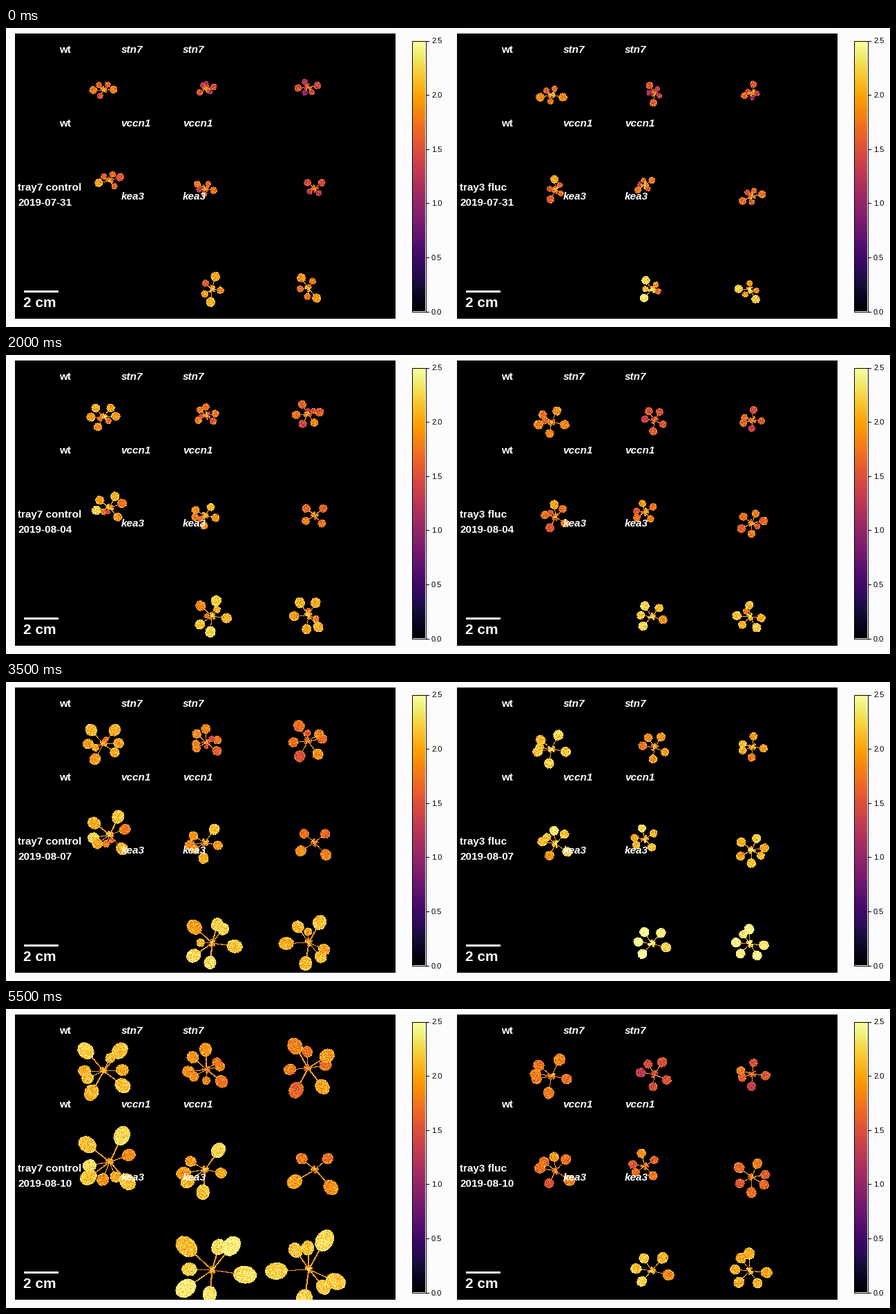
A matplotlib script that plays this animation: 1280x434 px, repeating every 6000 ms.

```python
import numpy as np
import matplotlib.pyplot as plt
from matplotlib.animation import FuncAnimation
from matplotlib.patches import Rectangle

W, H, DPI = 1280, 434, 100
TOP, BOTTOM = 8, 422
PANELS = (13, 653)
PANEL_W = 551
VMAX = 2.5
LAST_DAY = 10

# Share of full reach held by the true leaves, oldest first
LEAF_SHARE = (1, .97, .92, .9, .65, .55)


class Tray:
    """Growth habit and mean signal (day, value) shared by the plants of one tray."""

    def __init__(self, name, seed_reach, leaf_start, seed_share, power, signal):
        self.name, self.power, self.signal = name, power, signal
        self.seed_reach, self.leaf_start, self.seed_share = seed_reach, leaf_start, seed_share
        self.plants = []

    def plant(self, x, y, size, offset, *angles):
        """Angles in degrees, clockwise from the right: two seed leaves, then true leaves."""
        self.plants.append((x, y, size, offset, np.radians(angles)))

    def level(self, day):
        return np.interp(day, *zip(*self.signal))

    def reach(self, i, day):
        """Distance of leaf i from the crown as a share of plant size, or None."""
        if i < 2:
            birth, start, end = 0, self.seed_reach, self.seed_share
        else:
            birth = max(0, 2 * (i - 4))
            start = self.leaf_start if birth == 0 else .15
            end = LEAF_SHARE[i - 2]
        if day < birth:
            return None
        return start + (end - start) * ((day - birth) / (LAST_DAY - birth)) ** self.power


control = Tray("tray7 control", .38, .25, .7, 1.5, [(0, 1.85), (1, 2), (10, 2.02)])
control.plant(141, 90, 39, 0, 180, -3, -131, -51, 119, 37, 155, -62)
control.plant(290, 88, 29, -.2, -13, 150, -92, 38, -137, 174, -36, 90)
control.plant(437, 86, 37, -.28, 176, -10, -120, 118, 52, -33, -92)
control.plant(150, 222, 42, .05, 170, -20, -65, -142, 48, 144, 111, 69)
control.plant(288, 233, 34, 0, -150, 12, -55, 95, 170, 145)
control.plant(447, 233, 35, -.2, -140, -40, 48, 149)
control.plant(298, 379, 50, .1, -74, 95, -137, 8, 145, -51, 182)
control.plant(438, 378, 48, .08, -124, 50, -61, 177, 98, 24, -92)

fluctuating = Tray("tray3 fluc", .65, .38, .85, .8,
                   [(0, 1.92), (1, 1.58), (3, 1.65), (5, 2.05), (7, 2.22), (9, 1.85), (10, 1.75)])
fluctuating.plant(790, 97, 26, 0, 168, 12, -64, 100, -141, 186)
fluctuating.plant(939, 95, 21, -.3, -122, 97, -58, 188, 24)
fluctuating.plant(1081, 94, 19, -.15, 160, -85, 8, 95, -165)
fluctuating.plant(796, 235, 24, 0, -97, 118, 35, -170, -49, -142)
fluctuating.plant(925, 228, 19, 0, -33, 145, -105, 50, 187)
fluctuating.plant(1080, 244, 23, -.05, -10, 152, -143, 92, -68, 32)
fluctuating.plant(935, 380, 25, .35, -122, 133, 14, -50, 188)
fluctuating.plant(1077, 380, 25, .35, 185, 58, -92, 6, 133, -125)

TRAYS = (control, fluctuating)


def draw_stalk(field, x, y, angle, reach, rng):
    steps = np.linspace(0, reach, int(2 * reach) + 2)
    xs = (x + steps * np.cos(angle)).astype(int)
    ys = (y + steps * np.sin(angle)).astype(int)
    field[ys, xs] = rng.normal(2, .25, len(steps))
    if reach > 28:
        field[ys, xs + 1] = rng.normal(1.9, .25, len(steps))


def draw_blade(field, x, y, r, angle, value, rng):
    m = int(r * 1.3) + 2
    x0, y0 = int(x) - m, int(y) - m
    part = field[y0:y0 + 2 * m + 1, x0:x0 + 2 * m + 1]
    py, px = np.mgrid[:part.shape[0], :part.shape[1]]
    dx, dy = px + x0 + .5 - x, py + y0 + .5 - y
    stretch = 1 + .025 * max(0, r - 6)
    along = (dx * np.cos(angle) + dy * np.sin(angle)) / stretch
    across = (dy * np.cos(angle) - dx * np.sin(angle)) * stretch ** .5
    dist = np.hypot(along, across) + rng.normal(0, .2, part.shape)
    tone = value + rng.normal(0, .22, part.shape)
    tone += np.where(dist > r - 1, rng.uniform(-.2, .45, part.shape), 0)
    inside = dist < r
    part[inside] = np.clip(tone, .15, VMAX)[inside]


def draw_plant(field, tray, number, day):
    x, y, size, offset, angles = tray.plants[number]
    rng = np.random.default_rng([day, number])
    tints = np.random.default_rng(number).normal(0, .1, len(angles))
    level = tray.level(day) + offset
    leaves = [(a, size * s, t) for i, (a, t) in enumerate(zip(angles, tints))
              if (s := tray.reach(i, day)) is not None]
    for angle, reach, _ in leaves:
        draw_stalk(field, x, y, angle, reach, rng)
    for angle, reach, tint in leaves:
        age = .01 * (reach - 25) - .05 * max(0, 13 - reach)
        draw_blade(field, x + reach * np.cos(angle), y + reach * np.sin(angle),
                   2 + .25 * reach, angle, level + tint + age, rng)
    # Young leaves crowded at the crown
    for angle in angles[:4] + .6:
        draw_blade(field, x + 4 * np.cos(angle), y + 4 * np.sin(angle),
                   2, angle, level - rng.uniform(0, .4), rng)
    draw_blade(field, x, y, 2.5, 0, level + .1, rng)


def value_field(day):
    field = np.full((H, W), np.nan)
    for left, tray in zip(PANELS, TRAYS):
        field[TOP:BOTTOM, left:left + PANEL_W] = 0
        for number in range(len(tray.plants)):
            draw_plant(field, tray, number, day)
    field[BOTTOM:] = np.nan
    return field


plt.rcParams["font.family"] = "Liberation Sans"
fig = plt.figure(figsize=(W / DPI, H / DPI), dpi=DPI, facecolor="#fcfcff")
ax = fig.add_axes([0, 0, 1, 1])
ax.axis("off")


def show(data, extent):
    return ax.imshow(data, cmap="inferno", vmin=0, vmax=VMAX, extent=extent,
                     interpolation="nearest", aspect="auto")


def label(x, y, text, size=11, **style):
    return ax.text(x, y, text, size=size, color="white", weight="bold", **style)


image = show(value_field(0), (0, W, H, 0))
dates = []
for left, tray in zip(PANELS, TRAYS):
    for y, mutant in ((36, "stn7"), (143, "vccn1"), (249, "kea3")):
        if mutant != "kea3":
            label(left + 64, y, "wt")
        for dx in (153.5, 243):
            label(left + dx, y, mutant, style="italic")
    label(left + 4, 236, tray.name)
    dates.append(label(left + 4, 258, ""))
    ax.add_patch(Rectangle((left + 12.5, 381), 50.5, 2.5, color="white", lw=0))
    label(left + 12, 405, "2 cm", 15)

    bar = left + 575
    show(np.linspace(VMAX, 0, 256)[:, None], (bar, bar + 19, 411.5, 18.5))
    ax.add_patch(Rectangle((bar - .5, 18.5), 20, 393, fill=False, ec="black", lw=.7))
    for tick in np.arange(0, 2.6, .5):
        y = 411.5 - tick / VMAX * 393
        ax.plot([bar + 20, bar + 23.5], [y, y], color="black", lw=.8)
        ax.text(bar + 28, y + 4, f"{tick:.1f}", size=8, color="black")
ax.set_xlim(0, W)
ax.set_ylim(H, 0)


def update(frame):
    day = min(frame, LAST_DAY)
    image.set_data(value_field(day))
    for date in dates:
        date.set_text(f"2019-08-{day:02d}" if day else "2019-07-31")
    return [image, *dates]


anim = FuncAnimation(fig, update, frames=12, interval=500, repeat=True, repeat_delay=0)
plt.show()
```
